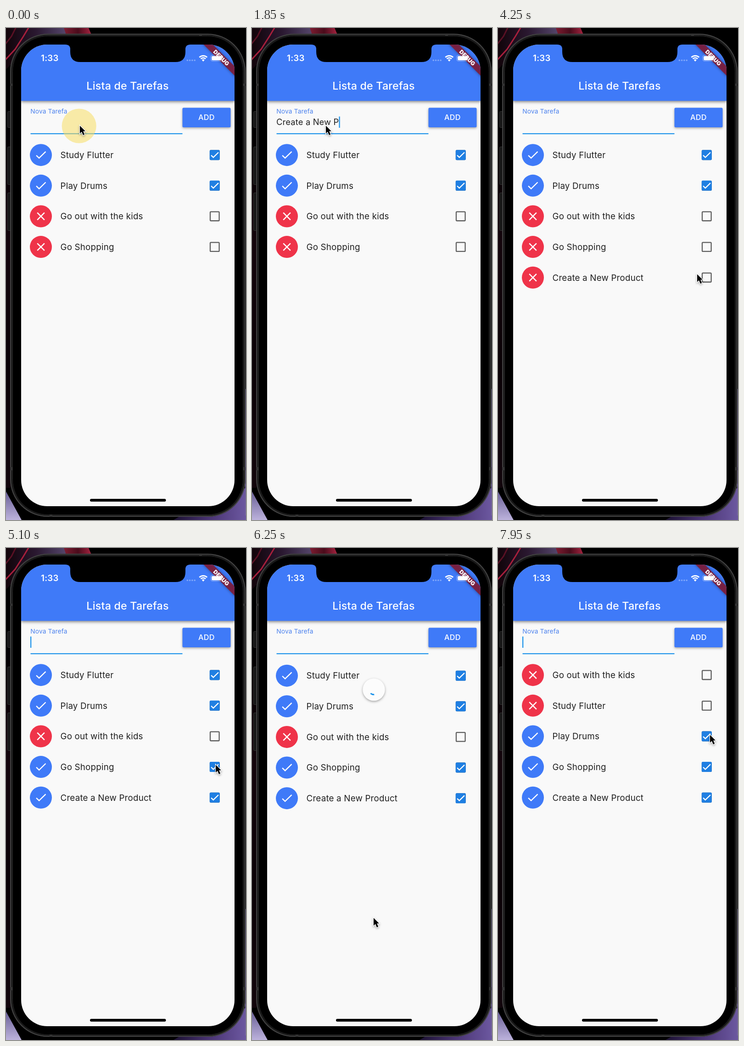
These frames come from a looping animation (523 px wide and 1070 px high, 8 s). An HTML page with a canvas:

```html
<!DOCTYPE html>
<html lang="pt">
<head>
<meta charset="utf-8">
<title>Lista de Tarefas</title>
<style>
html, body { margin: 0; width: 100%; height: 100%; overflow: hidden; background: #000; }
canvas { display: block; }
</style>
</head>
<body>
<canvas id="stage" width="523" height="1070"></canvas>
<script>
const g = document.getElementById('stage').getContext('2d');
g.letterSpacing = '0.18px';
const LOOP = 8000, BLUE = '#3f7af8', RED = '#ef3349', ACCENT = '#2094ea', BOX = '#1f7fe2';
const ADDED = 3550, RELEASED = 5800, SORTED = 7000;

// Field text and the moment each letter appears
const TASK = 'Create a New Product';
const KEYS = [450, 550, 600, 700, 750, 850, 900, 1000, 1150, 1450, 1550, 1600, 1650, 1800,
  2150, 2200, 2500, 2600, 2700, 2800];

// Tasks: initial state and the time it toggles
const TASKS = [
  { name: 'Study Flutter', done: true, toggle: 7560 },
  { name: 'Play Drums', done: true },
  { name: 'Go out with the kids', done: false },
  { name: 'Go Shopping', done: false, toggle: 4950 },
  { name: TASK, done: false, toggle: 4620 }
];

// Pointer: time, x, y
const PATH = [[0, 161, 212], [3050, 161, 212], [3380, 440, 196], [3650, 440, 196], [4250, 434, 535],
  [4450, 453, 540], [4630, 453, 540], [4820, 457, 471], [5130, 457, 471], [5420, 262, 350],
  [5470, 262, 350], [5750, 264, 787], [5850, 265, 804], [7050, 265, 804], [7430, 454, 341],
  [7600, 454, 341], [7930, 462, 406]];
const PRESSES = [[-80, 120], [3400, ADDED], [4500, 4620], [4850, 4950], [5450, RELEASED], [7450, 7560]];

const clamp = v => Math.max(0, Math.min(1, v));
const ease = v => { v = clamp(v); return v * v * (3 - 2 * v); };
const mix = (a, b, k) => a + (b - a) * k;
const rad = d => d * Math.PI / 180;

function pointer(t) {
  const i = PATH.findIndex(p => p[0] > t);
  if (i < 0) return PATH[PATH.length - 1].slice(1);
  const [a, b] = [PATH[i - 1], PATH[i]], k = ease((t - a[0]) / (b[0] - a[0]));
  return [mix(a[1], b[1], k), mix(a[2], b[2], k)];
}

function rect(x, y, w, h, r, fill) {
  g.beginPath();
  g.roundRect(x, y, w, h, r);
  if (fill) { g.fillStyle = fill; g.fill(); }
}
function outline(x, y, w, h, r, color, width) {
  rect(x, y, w, h, r);
  g.strokeStyle = color; g.lineWidth = width; g.stroke();
}
function disc(x, y, r, fill) {
  g.beginPath(); g.arc(x, y, r, 0, 7); g.fillStyle = fill; g.fill();
}
function line(color, width, ...pts) {
  g.beginPath();
  pts.forEach(p => g.lineTo(...p));
  g.strokeStyle = color; g.lineWidth = width; g.stroke();
}
function arc(x, y, r, from, to, color, width) {
  g.beginPath(); g.arc(x, y, r, rad(from), rad(to));
  g.strokeStyle = color; g.lineWidth = width; g.stroke();
}
function poly(fill, ...pts) {
  g.beginPath();
  pts.forEach(p => g.lineTo(...p));
  g.closePath(); g.fillStyle = fill; g.fill();
}
function text(s, x, y, size, color, weight = 400, align = 'left') {
  g.font = `${weight} ${size}px Inter, sans-serif`;
  g.textAlign = align; g.fillStyle = color; g.fillText(s, x, y);
}
function shade(color, blur, y) {
  g.shadowColor = color; g.shadowBlur = blur; g.shadowOffsetY = y;
}
const noShade = () => shade('transparent', 0, 0);
function fade(x0, y0, x1, y1, ...colors) {
  const f = g.createLinearGradient(x0, y0, x1, y1);
  colors.forEach((c, i) => f.addColorStop(i / (colors.length - 1), c));
  return f;
}

function wallpaper() {
  g.fillStyle = '#000'; g.fillRect(0, 0, 523, 1070);
  poly(fade(0, 0, 130, 0, '#12040a', '#2a1830', '#54456a'), [0, 0], [130, 0], [130, 14], [60, 30], [0, 90]);
  poly(fade(128, 0, 186, 0, '#7a1c30', '#4a0c1c', '#a52340'), [126, 0], [180, 0], [186, 14], [131, 14]);
  line('#a81f3c', 3, [50, -2], [38, 18], [20, 46], [-2, 70]);
  line('#5a1024', 3, [22, -2], [12, 18], [-2, 36]);
  g.fillStyle = fade(0, 200, 0, 1000, '#000', '#14050c', '#0a0206', '#12060c');
  g.fillRect(0, 200, 10, 800);
  poly(fade(0, 1010, 0, 1070, '#6c6298', '#bcb2dc'), [0, 1008], [34, 1070], [0, 1070]);
  poly(fade(365, 0, 523, 0, '#1a1030', '#4a3474', '#6c58a0'), [365, 1070], [385, 1058], [523, 1000], [523, 1070]);
  g.fillStyle = fade(0, 785, 0, 1060, '#4b4468', '#75669c'); g.fillRect(521, 785, 2, 275);
}

function body() {
  for (const [y, h] of [[181, 36], [258, 83], [358, 83]]) {
    rect(3, y, 9, h, 2, '#161616');
    outline(3.5, y + .5, 9, h - 1, 2, '#343434', 1);
  }
  rect(9, 12.5, 513, 1050.5, 82, '#1b1b1b');
  outline(10, 13.5, 511, 1048.5, 81, '#444', 2);
  rect(14, 17, 503, 1042, 77, '#000');
  outline(14.5, 17.5, 502, 1041, 77, '#262626', 1);
  g.fillStyle = '#333';
  g.fillRect(9, 121, 5, 5); g.fillRect(9, 955, 5, 7); g.fillRect(517, 121, 5, 5);
  g.fillRect(517, 955, 5, 7); g.fillRect(421, 12, 6, 5); g.fillRect(95, 1058, 6, 5);
}

function tick(x, y, s, width) {
  line('#fff', width, [x - 9.2 * s, y + .8 * s], [x - 3.6 * s, y + 6.2 * s], [x + 9.7 * s, y - 6.8 * s]);
}

function row(task, y, t) {
  const flipped = task.toggle !== undefined && t >= task.toggle;
  const done = task.done !== flipped;
  const k = flipped ? clamp((t - task.toggle) / 120) : 1;
  disc(76, y, 24, done ? BLUE : RED);
  if (done) tick(76, y, 1.08, 2.4);
  else {
    line('#fff', 2.5, [68.2, y - 7.8], [83.8, y + 7.8]);
    line('#fff', 2.5, [83.8, y - 7.8], [68.2, y + 7.8]);
  }
  text(task.name, 118.5, y + 6.8, 18.8, '#202020');
  outline(445, y - 9.8, 19.6, 19.6, 1.5, '#5e5e5e', 2.3);
  g.globalAlpha = done ? k : 1 - k;
  rect(443.8, y - 11, 22, 22, 2.5, BOX);
  tick(454.8, y, .84, 2.3);
  g.globalAlpha = 1;
}

function refresher(t, pull) {
  if (t < 5470 || t > SORTED + 200) return;
  const held = t < RELEASED, x = 265.5;
  const y = held ? mix(212, 352, clamp(pull / 180)) : mix(352, 308, ease((t - RELEASED) / 150));
  g.save();
  g.translate(x, y);
  const s = 1 - clamp((t - SORTED) / 200);
  g.scale(s, s);
  shade('rgba(0,0,0,.35)', 5, 2);
  disc(0, 0, 24.3, '#fcfcfc');
  noShade();
  if (t < RELEASED + 150) {
    const k = held ? clamp(pull / 180) : 1;
    const end = held ? mix(-60, 116, k) : 116 + (t - RELEASED) * .3;
    g.globalAlpha = k;
    arc(0, 0, 10.8, end - 288 * k, end, ACCENT, 2.9);
    g.rotate(rad(end));
    poly(ACCENT, [5.5, -1], [16, -1], [10.8, 5.5]);
    g.globalAlpha = 1;
  } else {
    const c = (t - 6077) / 1333, n = Math.floor(c), f = c - n;
    const tail = ease(2 * f - 1), head = ease(2 * f);
    const start = 70 + 120 * c + 270 * (n + tail);
    arc(0, 0, 10.8, start, start + Math.max(8, 270 * (head - tail)), ACCENT, 2.9);
  }
  g.restore();
}

function list(t, y) {
  const drag = 190 * Math.pow(clamp((y - 350) / 437), .85);
  const pull = t < 5470 ? 0 : t < RELEASED ? drag : 193 * Math.exp((RELEASED - t) / 92);
  const order = t < ADDED ? [0, 1, 2, 3] : t < SORTED ? [0, 1, 2, 3, 4] : [2, 0, 1, 3, 4];
  g.save();
  g.beginPath(); g.rect(33, 243, 465, 797); g.clip();
  order.forEach((n, i) => row(TASKS[n], 276.2 + 66.63 * i + pull, t));
  refresher(t, pull);
  g.restore();
}

function form(t) {
  text('Nova Tarefa', 53.3, 185.8, 13.7, '#4a80ee');
  const typed = t < ADDED ? TASK.slice(0, KEYS.filter(k => k <= t).length) : '';
  text(typed, 53, 211, 18.3, '#202020');
  const caret = t < 3000 ? t >= 50 : (t + 245) % 1000 < 490;
  g.fillStyle = ACCENT;
  if (caret) g.fillRect(53 + g.measureText(typed).width, 192.5, 2.3, 24.5);
  g.fillRect(53.5, 228.8, 331, 2.2);
  shade('rgba(0,0,0,.35)', 5, 2);
  rect(384.5, 173.5, 105, 42.5, 2.5, BLUE);
  noShade();
  text('ADD', 436.8, 200.3, 16.3, '#fff', 500, 'center');
}

function header() {
  shade('rgba(0,0,0,.45)', 6, 2);
  g.fillStyle = BLUE; g.fillRect(33, 36, 465, 122.5);
  noShade();
  text('Lista de Tarefas', 265, 133.8, 23.3, '#fff', 500, 'center');

  // Corner ribbon
  g.save();
  g.translate(498, 36); g.rotate(rad(45));
  shade('rgba(0,0,0,.5)', 6, 0);
  g.fillStyle = 'rgba(132,27,56,.87)'; g.fillRect(-80, 33.4, 160, 14.3);
  noShade();
  text('DEBUG', 0, 45, 12.2, '#fff', 900, 'center');
  g.restore();

  // Status bar
  text('1:33', 95.3, 72, 18.7, '#fff', 600, 'center');
  for (let i = 0; i < 4; i++) disc(395.3 + 5.3 * i, 70.3, 1.7, 'rgba(255,255,255,.35)');
  arc(429.8, 72.5, 12.2, 226, 314, '#fff', 2.8);
  arc(429.8, 72.5, 7.6, 226, 314, '#fff', 2.7);
  g.beginPath(); g.moveTo(429.8, 73); g.arc(429.8, 72.5, 4.2, rad(226), rad(314));
  g.fillStyle = '#fff'; g.fill();
  outline(446.2, 59, 26, 13, 4, 'rgba(255,255,255,.45)', 1.1);
  rect(448.2, 61, 22, 9.2, 2.3, '#fff');
}

// The press mark trails the pointer slightly
function halo(t) {
  for (const [down, up] of PRESSES) {
    if (t < down || t > up + 120) continue;
    const [x, y] = pointer(Math.max(0, t - 22)), k = clamp((t - down) / 150);
    g.globalAlpha = mix(.4, .65, k) * (1 - clamp((t - up) / 120));
    disc(x - 1.8, y + 1, mix(30, 44, k), '#f7dd61');
    g.globalAlpha = 1;
  }
}

const ARROW = new Path2D('M0 0V16.8L3.9 13.2L7 20.4L10.2 19L7.2 12H12Z');
function mouse(x, y) {
  g.save();
  g.translate(x, y + .5);
  shade('rgba(0,0,0,.35)', 4, 2);
  g.strokeStyle = '#fff'; g.lineWidth = 2.4; g.stroke(ARROW);
  noShade();
  g.fillStyle = '#000'; g.fill(ARROW);
  g.restore();
}

const NOTCH = new Path2D('M129 34V36Q140 36 140 46V52Q140 74 162 74H369Q391 74 391 52V46Q391 36 402 36V34Z');

function draw(t) {
  const [x, y] = pointer(t);
  wallpaper();
  body();
  g.save();
  rect(33, 36, 465, 1004, 57); g.clip();
  g.fillStyle = '#f9f9f9'; g.fillRect(33, 36, 465, 1004);
  list(t, y);
  form(t);
  header();
  g.fillStyle = '#000'; g.fill(NOTCH);
  rect(183, 1024, 165.5, 6, 3, '#000');
  g.restore();
  halo(t);
  mouse(x, y);
}

const begin = performance.now();
function frame() {
  draw((performance.now() - begin) % LOOP);
  requestAnimationFrame(frame);
}
frame();
</script>
</body>
</html>
```
